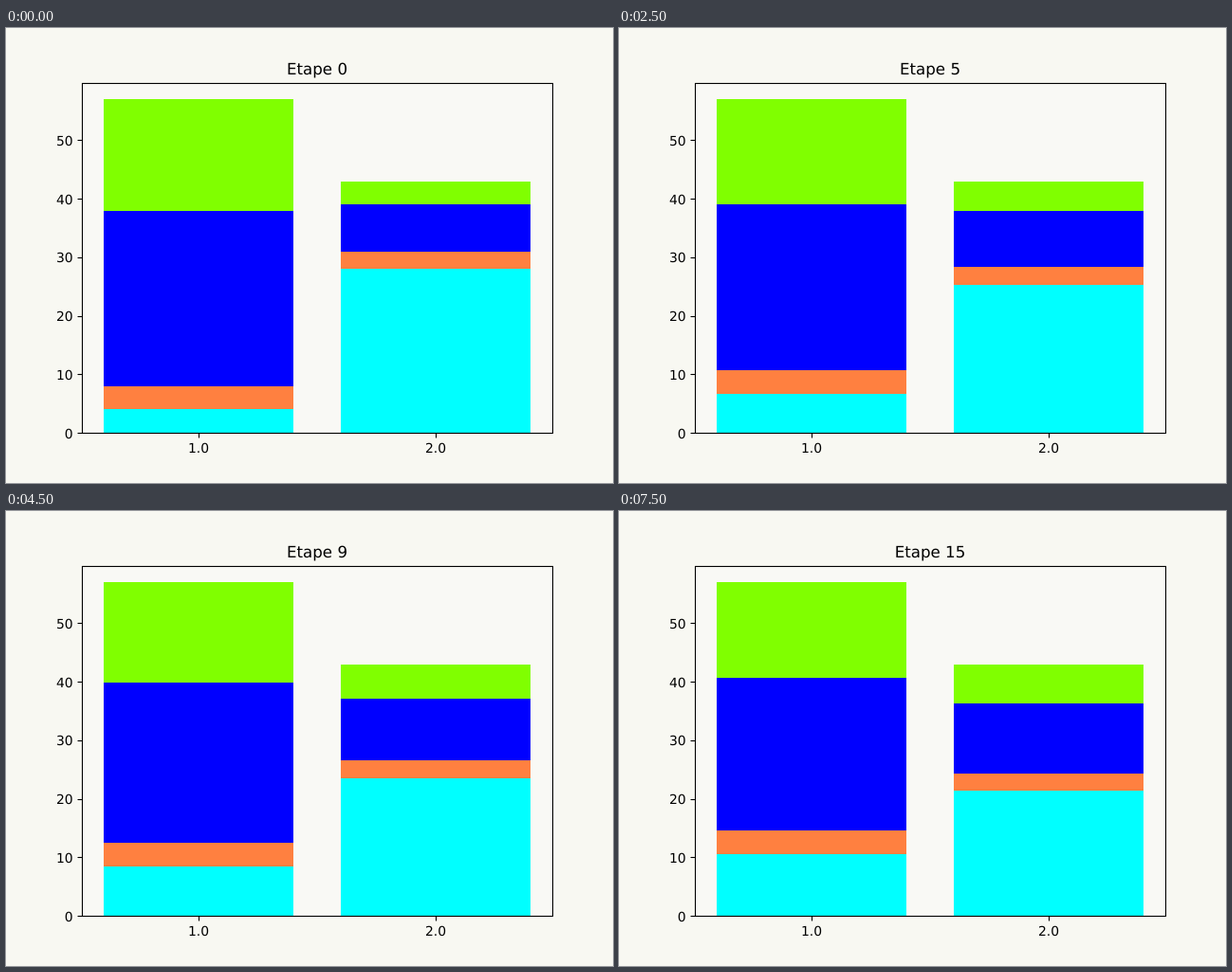
An HTML page that plays this animation: 640 px wide and 480 px high, repeating every 8000 ms.

```html
<!DOCTYPE html>
<html lang="fr">
<head>
<meta charset="utf-8">
<title>Etape</title>
<style>
  html, body { margin: 0; width: 100%; height: 100%; overflow: hidden; background: #f8f8f2; }
  svg { display: block; }
  text { font: 13.889px "DejaVu Sans", sans-serif; text-rendering: geometricPrecision; }
  .title { font-size: 16.667px; }
  .mid { text-anchor: middle; }
  .end { text-anchor: end; }
  .bar { shape-rendering: crispEdges; }
  .line { fill: none; stroke: #000; stroke-width: 1.111; }
</style>
</head>
<body>
<svg width="640" height="480" viewBox="0 0 640 480">
  <rect x="80" y="58" width="496" height="369" fill="#f9f9f5"/>
  <g id="bars"></g>
  <g id="axes"></g>
  <rect class="line" x="80.5" y="58.5" width="496" height="369"/>
  <text id="title" class="title mid" x="328" y="49"></text>
</svg>
<script>
const STEP_MS = 500, STEPS = 16;
const BASE = 427.2, SCALE = 369.6 / 59.85;
const COLORS = ['#00ffff', '#ff8040', '#0000ff', '#80ff00'];
const LEFT = [4, 4, 30, 19], RIGHT = [28, 3, 8, 4];
const BAR_X = [103, 353];

const $ = id => document.getElementById(id);
const sum = list => list.reduce((a, b) => a + b, 0);
const yOf = value => BASE - value * SCALE;

function add(parent, tag, attrs, text = '') {
  const el = document.createElementNS('http://www.w3.org/2000/svg', tag);
  for (const key in attrs) el.setAttribute(key, attrs[key]);
  el.textContent = text;
  return parent.appendChild(el);
}

// Each step swaps one average unit between the two groups.
const sizeL = sum(LEFT), sizeR = sum(RIGHT);
const rate = 1 - 1 / sizeL - 1 / sizeR;

function groupsAt(step) {
  const left = LEFT.map((a, i) => {
    const rest = (a + RIGHT[i]) * sizeL / (sizeL + sizeR);
    return rest + (a - rest) * rate ** step;
  });
  return [left, left.map((a, i) => LEFT[i] + RIGHT[i] - a)];
}

const bars = BAR_X.map(x => COLORS.map(fill =>
  add($('bars'), 'rect', { class: 'bar', x, width: 200, fill })));

for (let v = 0; v <= 50; v += 10) {
  const y = yOf(v);
  add($('axes'), 'path', { class: 'line', d: `M75.5 ${Math.round(y) + 0.5}h5` });
  add($('axes'), 'text', { class: 'end', x: 70.6, y: Math.round(y + 5.5) }, v);
}
[203, 453].forEach((x, i) => {
  add($('axes'), 'path', { class: 'line', d: `M${x + 0.5} 427.5v5` });
  add($('axes'), 'text', { class: 'mid', x, y: 448 }, (i + 1).toFixed(1));
});

function draw(step) {
  $('title').textContent = 'Etape ' + step;
  groupsAt(step).forEach((group, g) => {
    let total = 0;
    group.forEach((value, i) => {
      const bottom = Math.round(yOf(total));
      total += value;
      const top = Math.round(yOf(total));
      bars[g][i].setAttribute('y', top);
      bars[g][i].setAttribute('height', bottom - top);
    });
  });
}

let shown = 0;
const start = performance.now();
function tick() {
  const time = Math.max(0, performance.now() - start);
  const step = Math.floor(time / STEP_MS) % STEPS;
  if (step !== shown) draw(shown = step);
  requestAnimationFrame(tick);
}
draw(0);
requestAnimationFrame(tick);
</script>
</body>
</html>
```
